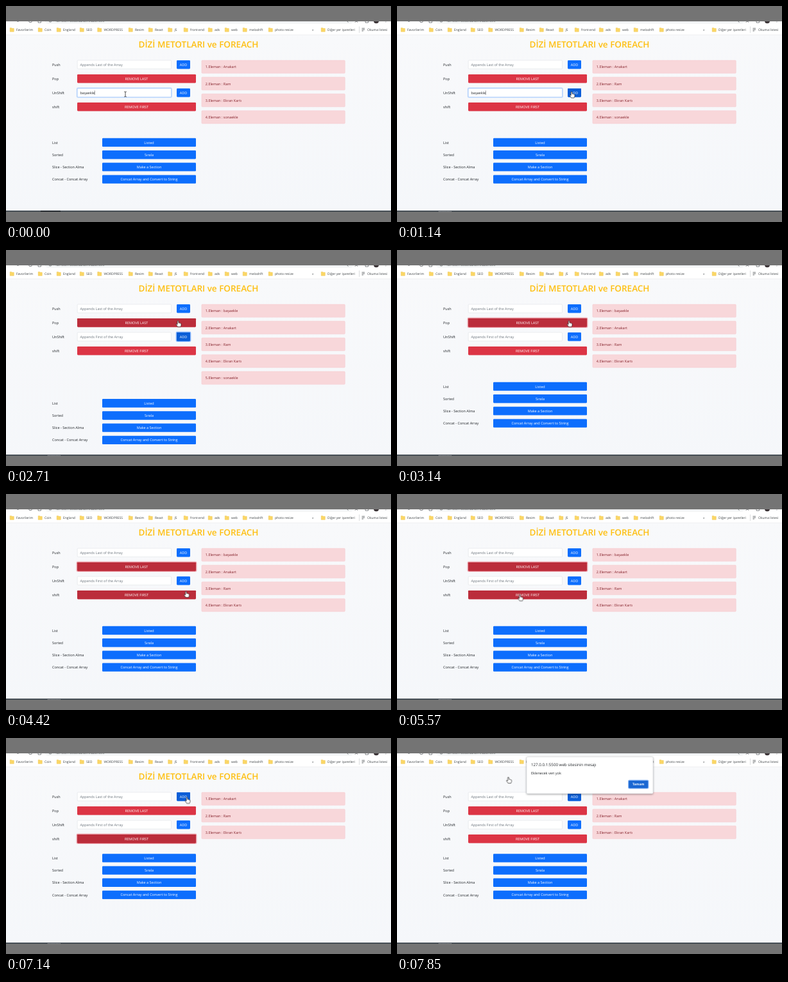
Animation, 600 px wide and 338 px high, one loop 8 s. Source, as an HTML page:

```html
<!DOCTYPE html>
<html lang="tr">
<head>
<meta charset="utf-8">
<title>Dizi Metotları</title>
<style>
html, body { margin: 0; width: 100%; height: 100%; overflow: hidden; background: #747474; }
svg { display: block; width: 600px; height: 338px; }
text { font: 5.5px "Open Sans", "Noto Sans", sans-serif; fill: #212529; text-rendering: geometricPrecision; }
.bar { font-size: 5px; fill: #3c4043; }
.title { font-size: 13.5px; font-weight: 600; fill: #febf10; }
.on { fill: #fff; }
.mid { text-anchor: middle; }
.hint { fill: #6c757d; }
.red { fill: #842029; }
.field { fill: #fff; stroke: #ced4da; stroke-width: .4; }
.alert { fill: #f8d7da; stroke: #f5c2c7; stroke-width: .4; }
.blue { fill: #0d6efd; }
.danger { fill: #dc3545; }
.blue.dark { fill: #0b5ed7; }
.danger.dark { fill: #bb2d3b; }
.ring { fill: #3184fd; opacity: .5; }
.danger-ring { fill: #e15361; }

/* Everything shares one 8 s clock */
[data-show] { animation: 8s step-end infinite; }
[data-show=typing] { animation-name: typing; }
[data-show=cleared] { animation-name: cleared; }
[data-show=five] { animation-name: five; }
[data-show=four] { animation-name: four; }
[data-show=prepended] { animation-name: prepended; }
[data-show=plain] { animation-name: plain; }
[data-show=unshiftHover] { animation-name: unshiftHover; }
[data-show=unshiftFocus] { animation-name: five; }
[data-show=popHover] { animation-name: popHover; }
[data-show=popFocus] { animation-name: popFocus; }
[data-show=shiftHover] { animation-name: shiftHover; }
[data-show=shiftFocus] { animation-name: shiftFocus; }
[data-show=pushHover] { animation-name: pushHover; }
[data-show=dialog] { animation-name: dialog; }
[data-show=early] { animation-name: early; }
[data-show=late] { animation-name: late; }
[data-show=ibeam] { animation-name: ibeam; }
[data-show=arrow] { animation-name: arrow; }
[data-show=hand] { animation-name: hand; }
@keyframes typing { 0% { visibility: visible } 17.75%, 100% { visibility: hidden } }
@keyframes cleared { 0% { visibility: hidden } 17.75%, 100% { visibility: visible } }
@keyframes five { 0%, 35.5%, 100% { visibility: hidden } 17.75% { visibility: visible } }
@keyframes four { 0% { visibility: visible } 71.25%, 100% { visibility: hidden } }
@keyframes prepended { 0%, 71.25%, 100% { visibility: hidden } 17.75% { visibility: visible } }
@keyframes plain { 0%, 71.25%, 100% { visibility: visible } 17.75% { visibility: hidden } }
@keyframes unshiftHover { 0%, 35.5%, 100% { visibility: hidden } 13.5% { visibility: visible } }
@keyframes popHover { 0%, 71.25%, 100% { visibility: hidden } 31.5% { visibility: visible } }
@keyframes popFocus { 0%, 71.25%, 100% { visibility: hidden } 35.5% { visibility: visible } }
@keyframes shiftHover { 0%, 92.75%, 100% { visibility: hidden } 50.5% { visibility: visible } }
@keyframes shiftFocus { 0%, 92.75%, 100% { visibility: hidden } 71.25% { visibility: visible } }
@keyframes pushHover { 0% { visibility: hidden } 87%, 100% { visibility: visible } }
@keyframes dialog { 0% { visibility: hidden } 95.5%, 100% { visibility: visible } }
@keyframes early { 0% { visibility: visible } 9%, 100% { visibility: hidden } }
@keyframes late { 0% { visibility: hidden } 9%, 100% { visibility: visible } }
@keyframes ibeam { 0%, 22% { visibility: visible } 11.5%, 29%, 100% { visibility: hidden } }
@keyframes arrow { 0%, 13.5%, 22%, 31.5%, 100% { visibility: hidden } 11.5%, 19.5%, 29% { visibility: visible } }
@keyframes hand { 0%, 19.5% { visibility: hidden } 13.5%, 31.5%, 100% { visibility: visible } }

#caret { animation: blink 1.06s step-end infinite; }
@keyframes blink { 0% { opacity: 1 } 50%, 100% { opacity: 0 } }

#lower { animation: reflow 8s step-end infinite; }
@keyframes reflow {
  0%, 35.5% { transform: translateY(0) }
  17.75% { transform: translateY(26.25px) }
  71.25%, 100% { transform: translateY(-25.6px) }
}

#cursor { animation: roam 8s linear infinite; }
@keyframes roam {
  0%, 10% { transform: translate(186px, 138px) }
  14%, 18.5% { transform: translate(272px, 134px) }
  23%, 28% { transform: translate(356px, 96px) }
  33%, 44% { transform: translate(268px, 110.5px) }
  51%, 57% { transform: translate(280.5px, 152px) }
  66%, 74% { transform: translate(191.5px, 157.5px) }
  79%, 83.9% { transform: translate(240px, 155px) }
  87.5%, 94.7% { transform: translate(282px, 92.5px) }
  98%, 100% { transform: translate(173.5px, 61px) }
}
</style>
</head>
<body>
<svg viewBox="0 0 600 338">
  <defs>
    <linearGradient id="page" x2="0" y2="1">
      <stop stop-color="#f8f9fb"/><stop offset="1" stop-color="#f5f7fa"/>
    </linearGradient>
    <clipPath id="stage"><rect y="24" width="600" height="298"/></clipPath>
    <filter id="shadow" x="-10%" y="-20%" width="120%" height="150%">
      <feDropShadow dx="0" dy="1" stdDeviation="1.4" flood-opacity=".4"/>
    </filter>
  </defs>
  <rect width="600" height="338" fill="#747474"/>
  <g clip-path="url(#stage)">
    <rect y="24" width="600" height="22" fill="#fff"/>
    <rect x="60" y="17" width="482" height="10.4" rx="5" fill="#f1f3f4"/>
    <g fill="none" stroke="#5f6368" stroke-width=".8">
      <path d="M16 22.5l2.5 2.5 2.5-2.5M50 22v4h4.5v-4M529.5 22l4 3.5M543.5 25.5l2.5-1.5 2.5 1.5M560 22v4h4.5v-4"/>
      <circle cx="38" cy="23.2" r="2.6"/><circle cx="69" cy="23" r="2.1"/>
    </g>
    <circle cx="577" cy="23.2" r="4" fill="#3c3437"/>
    <circle cx="592" cy="25" r=".6" fill="#5f6368"/>
    <text class="bar" x="77" y="25">127.0.0.1:5500/diziler/index.html</text>
    <g id="marks"></g>
    <text class="bar" x="477" y="39">»</text>
    <path d="M550.5 32v10" stroke="#c4c7ca" stroke-width=".6"/>
    <path d="M554.5 35h4.5M554.5 37h4.5M554.5 39h2.5" stroke="#3c4043" stroke-width=".7"/>
    <text class="bar" x="563" y="38.8">Okuma listesi</text>
    <rect y="45.4" width="600" height="275" fill="url(#page)"/>
    <path d="M0 45.2h600" stroke="#e3e5e8" stroke-width=".6"/>
    <text class="title mid" x="300" y="65.2">DİZİ METOTLARI ve FOREACH</text>
    <g id="form"></g>
    <g id="list"></g>
    <g id="lower"></g>
    <rect y="320.3" width="600" height="1.7" fill="#3b444c"/>
    <path data-show="early" d="M54 321.2h31" stroke="#1d2227" stroke-width="1.6"/>
  </g>
  <path data-show="late" d="M65 321.6h20" stroke="#a4a8ac" stroke-width="1" stroke-dasharray="1.4 1"/>

  <g data-show="dialog">
    <rect x="202" y="29.5" width="197" height="57.5" rx="1.6" fill="#fff" stroke="#b9bcc0" stroke-width=".4" filter="url(#shadow)"/>
    <text x="209" y="44" style="font-size:6.2px">127.0.0.1:5500 web sitesinin mesajı</text>
    <text x="209" y="56.5">Eklenecek veri yok</text>
    <rect x="360" y="65.6" width="32.4" height="14" rx="2" fill="#8ab6f5"/>
    <rect x="361.2" y="66.8" width="30" height="11.6" rx="1.3" fill="#1a67d2"/>
    <text class="on mid" x="376.2" y="74.4" style="font-size:5px;font-weight:700">Tamam</text>
  </g>

  <g id="cursor">
    <path data-show="ibeam" d="M-1.8 -4q1.8 0 1.8 1q0 -1 1.8 -1M0 -3v6M-1.8 4q1.8 0 1.8 -1q0 1 1.8 1" fill="none" stroke="#222" stroke-width=".8"/>
    <path data-show="arrow" d="M0 0v8l1.9-1.7 1.3 2.9 1.3-.6-1.3-2.8h2.5z" fill="#fff" stroke="#111" stroke-width=".6"/>
    <path data-show="hand" d="M-.9 .8Q0 -.8 .9 .8V3.6Q2 3 2.5 3.9Q3.5 3.5 3.9 4.4Q5 4.2 5 5.4V7.3Q4.7 8.6 4 9.8H-.3L-2.7 6.4Q-3.2 5.2 -2.2 5.1L-.9 6.2Z" fill="#fff" stroke="#111" stroke-width=".65" stroke-linejoin="round"/>
  </g>
</svg>
<script>
const $ = id => document.getElementById(id);
const show = name => name ? ` data-show="${name}"` : '';
const rect = (x, y, w, h, cls, name, r = 1.3) =>
  `<rect x="${x}" y="${y}" width="${w}" height="${h}" rx="${r}" class="${cls}"${show(name)}/>`;
const text = (x, y, str, cls = '', name) =>
  `<text x="${x}" y="${y}" class="${cls}"${show(name)}>${str}</text>`;

const H = 13.4;
const ring = (x, y, w, cls, name) => rect(x - 1.4, y - 1.4, w + 2.8, H + 2.8, 'ring ' + cls, name, 2.4);

function button(x, y, w, label, color, hover, focus) {
  return (focus ? ring(x, y, w, color + '-ring', focus) : '')
    + rect(x, y, w, H, color)
    + (hover ? rect(x, y, w, H, color + ' dark', hover) : '')
    + text(x + w / 2, y + 8.7, label, 'on mid');
}

const folder = x =>
  `<path d="M${x - 3} 34.2h2.4l.8.8h2.9v5.2h-6.1z" fill="#fbd766" stroke="#e9bd45" stroke-width=".4"/>`;
const marks = [[16, 'Favorilerim'], [60, 'Coin'], [89, 'England'], [125, 'SEO'], [152.5, 'WORDPRESS'],
  [201, 'Resim'], [232, 'React'], [262.5, 'JS'], [287, 'front-end'], [325, 'ads'], [351, 'web'],
  [379, 'melodrift'], [419, 'photo resize'], [501, 'Diğer yer işaretleri']];
$('marks').innerHTML = marks.map(([x, name]) => folder(x - 6.8) + text(x, 38.8, name, 'bar')).join('');

const rowY = i => 85 + i * 22;
const field = y => rect(111.2, y, 146.3, H, 'field');
$('form').innerHTML =
  ['Push', 'Pop', 'UnShift', 'shift'].map((s, i) => text(72, rowY(i) + 8.8, s)).join('')
  + field(rowY(0)) + text(115.5, rowY(0) + 8.7, 'Appends Last of the Array', 'hint')
  + button(266, rowY(0), 21, 'ADD', 'blue', 'pushHover')
  + button(111, rowY(1), 185, 'REMOVE LAST', 'danger', 'popHover', 'popFocus')
  + `<g data-show="typing"><rect x="109.8" y="${rowY(2) - 1.4}" width="149.1" height="${H + 2.8}" rx="2.4" fill="#c2dbfe"/></g>`
  + field(rowY(2))
  + `<g data-show="typing"><rect x="111.2" y="${rowY(2)}" width="146.3" height="${H}" rx="1.3" fill="#fff" stroke="#86b7fe" stroke-width=".5"/>`
  + text(115.5, rowY(2) + 8.7, 'başaekle')
  + `<path id="caret" d="M138.2 ${rowY(2) + 3.4}v6.8" stroke="#212529" stroke-width=".5"/></g>`
  + text(115.5, rowY(2) + 8.7, 'Appends First of the Array', 'hint', 'cleared')
  + button(266, rowY(2), 21, 'ADD', 'blue', 'unshiftHover', 'unshiftFocus')
  + button(111, rowY(3), 185, 'REMOVE FIRST', 'danger', 'shiftHover', 'shiftFocus');

const words = ['Anakart', 'Ram', 'Ekran Kartı', 'sonaekle'];
const itemY = i => 85 + i * 26.25;
const itemText = (word, i, name) => text(310.8, itemY(i) + 12.3, `${i + 1}.Eleman : ${word}`, 'red', name);
const boxes = [, , , 'four', 'five'];
$('list').innerHTML =
  [0, 1, 2, 3, 4].map(i => rect(304.9, itemY(i), 223.4, 20.3, 'alert', boxes[i])).join('')
  + words.map((w, i) => itemText(w, i, i < 3 ? 'plain' : 'typing')).join('')
  + ['başaekle', ...words].map((w, i) => itemText(w, i, i < 4 ? 'prepended' : 'five')).join('');

const tools = [['List', 'Listed'], ['Sorted', 'Sırala'], ['Slice - Section Alma', 'Make a Section'],
  ['Concat - Concat Array', 'Concat Array and Convert to String']];
$('lower').innerHTML = tools.map(([label, action], i) => {
  const y = 206.8 + i * 19.2;
  return text(72, y + 8.8, label) + button(150, y, 146, action, 'blue');
}).join('');
</script>
</body>
</html>
```
